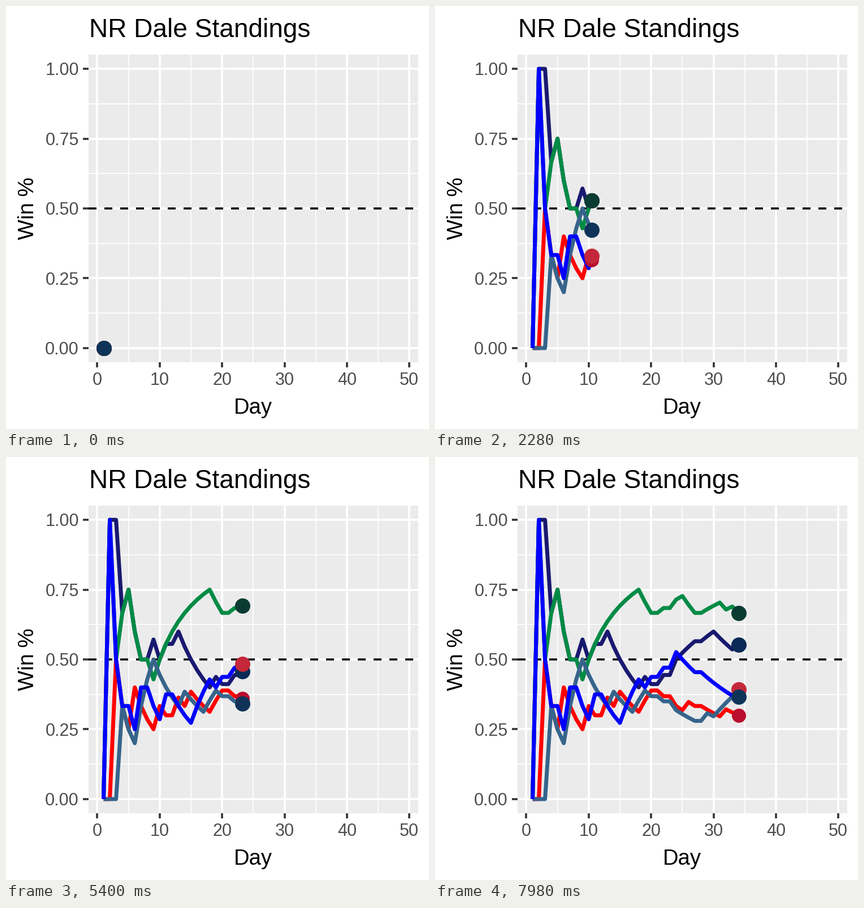
These frames come from a looping animation (748 by 748 pixels, 8 s). A matplotlib script:

```python
import numpy as np
import matplotlib.pyplot as plt
from matplotlib.animation import FuncAnimation
from matplotlib.patches import Rectangle

SIZE, DPI = 748, 88
PX = 72 / DPI                      # points per pixel
LEFT, RIGHT, TOP, BOTTOM = 145.6, 728.8, 86.3, 629.5
TICK = 9.5

plt.rcParams["font.family"] = ["Liberation Sans", "DejaVu Sans"]

# Daily results per team: W win, L loss, - no game.
TEAMS = [
    ("#191970", "#0B2A55", 27,
     "- W W L W L L - W L W - W L L L L L W L - W - WW W W W - W W L L L W"),
    ("#FF0000", "#BA0F2E", 25,
     "- L W L L W L L L W L - W L W L L L W W - L - LL L W L - L L L W L L"),
    ("#008B45", "#0A3B33", 27,
     "- W L W W L L - L W W W W W W W W W L L - W - WW W L L - W W W L W L"),
    ("#36648B", "#0F3358", 27,
     "- L L W L L W W W L L L L W L L L W W L - L - LL L L L - W L W W W -"),
    ("#0000FF", "#C4283A", 27,
     "- W L L - L W - L L W - L L L W W W L W - W - WW L L L - L L L L L W"),
]
BADGE_ORDER = [0, 1, 2, 4, 3]


def px_x(day):
    return 161.5 + 11.035 * day


def px_y(pct):
    return 604.9 - 493.8 * pct


def win_pct(results):
    wins = games = 0
    out = []
    for day in results.split():
        wins += day.count("W")
        games += len(day.replace("-", ""))
        out.append(wins / games if games else 0.0)
    return np.array(out)


fig = plt.figure(figsize=(SIZE / DPI, SIZE / DPI), dpi=DPI, facecolor="white")
ax = fig.add_axes([0, 0, 1, 1])
ax.set_xlim(0, SIZE)
ax.set_ylim(SIZE, 0)
ax.axis("off")


def segments(pairs, color, width, z):
    """Draw separate straight strokes as one path."""
    xs, ys = [], []
    for x1, y1, x2, y2 in pairs:
        xs += [x1, x2, np.nan]
        ys += [y1, y2, np.nan]
    ax.plot(xs, ys, color=color, lw=width * PX, solid_capstyle="butt", zorder=z)


def label(x, y, text, size, color="black", ha="center", rotation=0):
    ax.text(x, y, text, fontsize=size * PX, color=color, ha=ha, va="baseline",
            rotation=rotation, rotation_mode="anchor")


def grid(days, pcts, width, z):
    segments([(px_x(d), TOP, px_x(d), BOTTOM) for d in days]
             + [(LEFT, px_y(p), RIGHT, px_y(p)) for p in pcts],
             "white", width, z)


ax.add_patch(Rectangle((LEFT, TOP), RIGHT - LEFT, BOTTOM - TOP,
                       facecolor="#EBEBEB", lw=0, zorder=0))
day_ticks = range(0, 51, 10)
pct_ticks = np.linspace(0, 1, 5)
grid(range(5, 50, 10), pct_ticks[:-1] + 0.125, 1.8, 1)
grid(day_ticks, pct_ticks, 3.6, 2)
segments([(px_x(d), BOTTOM, px_x(d), BOTTOM + TICK) for d in day_ticks]
         + [(LEFT - TICK, px_y(p), LEFT, px_y(p)) for p in pct_ticks],
         "#333333", 3.6, 2)

for d in day_ticks:
    label(px_x(d), 670.3, str(d), 30.5, "#4D4D4D")
for p in pct_ticks:
    label(129, px_y(p) + 11.3, f"{p:.2f}", 30.5, "#4D4D4D", ha="right")
label(538.5, 55.3, "NR Dale Standings", 46, ha="right")
label((LEFT + RIGHT) / 2, 721, "Day", 38.2)
label(49, (TOP + BOTTOM) / 2, "Win %", 38.2, rotation=90)

ax.plot([LEFT, RIGHT], [px_y(0.5)] * 2, color="black", lw=3.6 * PX,
        dashes=(14 / 3.6, 14 / 3.6), dash_capstyle="butt", zorder=3)

pcts = [win_pct(team[3]) for team in TEAMS]
days = np.arange(1, len(pcts[0]) + 1)
# Every day lands on a whole animation step.
day_steps = np.round((days - 1) * 198 / 49)

lines, badges = [], []
for i, (color, badge, size, _) in enumerate(TEAMS):
    lines += ax.plot([], [], color=color, lw=7 * PX, solid_capstyle="butt",
                     solid_joinstyle="round", zorder=4 + i)
    badges += ax.plot([], [], "o", color=badge, ms=size * PX, mew=0,
                      zorder=10 + BADGE_ORDER.index(i))


def update(frame):
    now = np.interp(frame // 3, day_steps, days)
    past = days < now
    shown = np.append(days[past], now)
    for pct, line, badge in zip(pcts, lines, badges):
        current = np.interp(now, days, pct)
        line.set_data(px_x(shown), px_y(np.append(pct[past], current)))
        badge.set_data([px_x(now)], [px_y(current)])
    return lines + badges


# Steps last 60 ms; the last one is cut to 20 ms.
anim = FuncAnimation(fig, update, frames=400, interval=20, repeat=True,
                     repeat_delay=0, init_func=lambda: update(0), blit=False)
plt.show()
```
